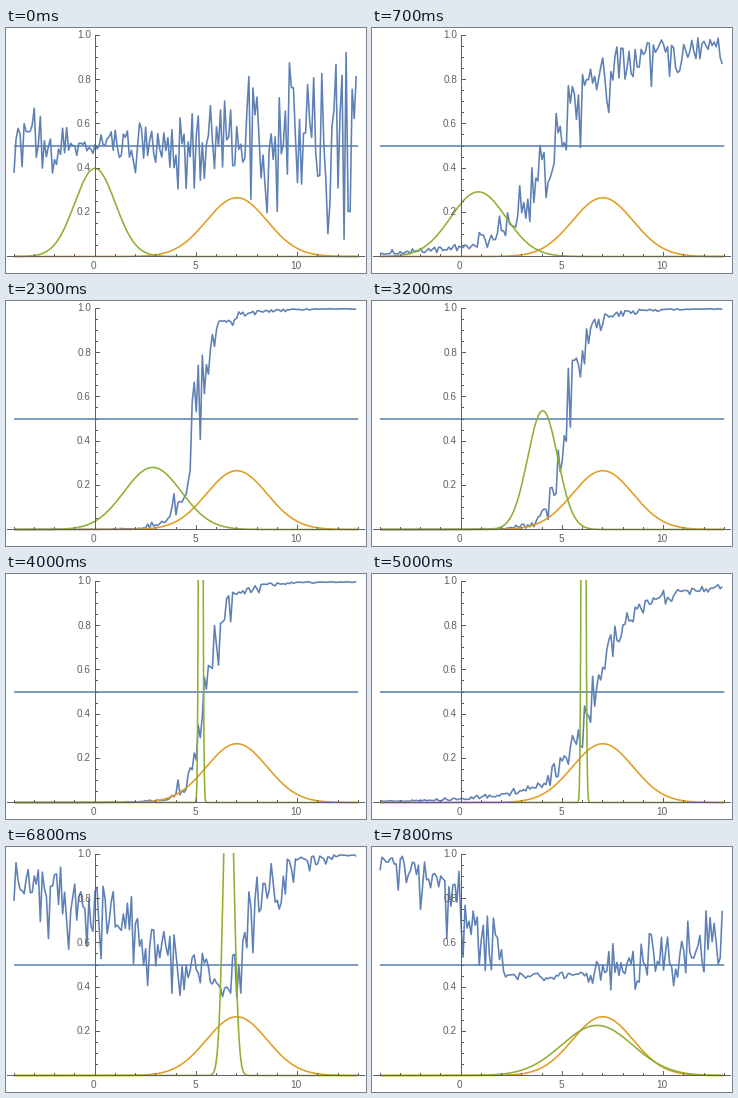
Animation, 360 px wide and 245 px high, one loop 8 s. Source, as a matplotlib script:

```python
import numpy as np
import matplotlib.pyplot as plt
from matplotlib.animation import FuncAnimation
from matplotlib.patches import Rectangle

W, H, DPI = 360, 245, 100
PT = 72 / DPI                      # points per pixel
X0, Y0, SX, SY = 89.0, 228.5, 20.25, 221.0
AXIS_X = 89.5
BLUE = (0.368, 0.507, 0.710)
ORANGE = (0.881, 0.611, 0.142)
GREEN = (0.560, 0.692, 0.195)
GRAY = "#606060"
TICKS, TICK_MS, STEPS = 80, 100, 48

plt.rcParams["font.family"] = "Liberation Sans"

# Generator state at a few training steps; linear in between.
KEYS = [0, 9, 14, 24, 30, 41, 47]
MEAN = [0, 1.93, 2.85, 5.22, 6.05, 6.60, 6.72]
SIGMA = [1, 1.82, 1.42, 0.065, 0.07, 0.24, 1.76]

grid = np.linspace(-4, 13, 1701)
samples = np.arange(-4, 12.95, 0.1)


def px(x):
    return X0 + SX * np.asarray(x)


def py(y):
    return Y0 - SY * np.asarray(y)


def normal(x, mean, sigma):
    return np.exp(-0.5 * ((x - mean) / sigma) ** 2) / (sigma * np.sqrt(2 * np.pi))


def ramp(step, start, end):
    return np.clip((step - start) / (end - start), 0, 1)


def mix(a, b, t):
    return a + (b - a) * t


def cliff(x, step):
    """Logit and spread while the two classes are told apart by one edge."""
    soft = ramp(step, 24, 30)
    u = x - np.interp(step, [9, 14, 24, 30], [4.55, 5.0, 5.45, 6.55])
    logit = mix(2.5, 1.9, soft) * np.arcsinh(mix(0.85, 0.55, soft) * u)
    logit += mix(0.4, 0.05, soft) * np.minimum(u, 0)
    return logit, mix(0.45, 0.25, soft)


def valley(x, step):
    """Logit and spread once the fake peak sits on the real one."""
    t = ramp(step, 41, 47)
    left = mix(0.24, 0.65, t) * np.maximum(mix(6.4, 2.3, t) - x, 0)
    right = mix(1.05, 0.11, t) * np.maximum(x - mix(6.6, 6.0, t), 0)
    return mix(-0.4, -0.2, t) + left + right, 0.04 + 0.4 * np.sqrt(left + right)


def discriminator(step):
    logit, spread = cliff(samples, step)
    end_logit, end_spread = valley(samples, step)
    known, merged = ramp(step, 0, 9), ramp(step, 30, 41)
    logit = mix(logit * known, end_logit, merged)
    spread = mix(0.07 + 0.09 * np.abs(samples), spread, known)
    spread = mix(spread, end_spread, merged)
    rng = np.random.default_rng(100 + step)
    noise = np.clip(rng.standard_normal(samples.size), -2.1, 2.1)
    return 1 / (1 + np.exp(-(logit + spread * noise)))


fig = plt.figure(figsize=(W / DPI, H / DPI), dpi=DPI, facecolor="white")
ax = fig.add_axes([0, 0, 1, 1])
ax.set_xlim(0, W)
ax.set_ylim(H, 0)
ax.axis("off")

window = Rectangle((0, 6), W, 225, transform=ax.transData)


def curve(x, y, color, z):
    line, = ax.plot(px(x), py(y), color=color, lw=1.6 * PT, zorder=z, snap=False,
                    solid_joinstyle="round", solid_capstyle="butt")
    line.set_clip_path(window)
    return line


def rule(xs, ys):
    ax.plot(xs, ys, color=GRAY, lw=PT, zorder=6, snap=False, solid_capstyle="butt")


def label(x, y, text, align):
    ax.text(x, y, text, size=10 * PT, color=GRAY, ha=align, va="baseline", zorder=7)


def draw_axes():
    rule([1, 359], [Y0, Y0])
    rule([AXIS_X, AXIS_X], [7, Y0])
    for n in range(-4, 14):
        major = n % 5 == 0
        x = np.floor(px(n)) + 0.5
        rule([x, x], [Y0, Y0 - (4.5 if major else 2.5)])
        if major and n >= 0:
            label(px(n) - 1.3, 240.5, str(n), "center")
    for n in range(1, 21):
        major = n % 4 == 0
        y = np.floor(py(n / 20)) + 0.5
        rule([AXIS_X, AXIS_X + (4.5 if major else 2.5)], [y, y])
        if major:
            label(85, py(n / 20) + 3.0, f"{n / 20:.1f}", "right")


draw_axes()
score = curve(samples, discriminator(0), BLUE, 2)
curve([-4, 13], [0.5, 0.5], BLUE, 3)
curve(grid, normal(grid, 7, 1.5), ORANGE, 4)
fake = curve(grid, normal(grid, 0, 1), GREEN, 5)


def update(i):
    step = min(int((i + 0.5) * STEPS / TICKS), STEPS - 1)
    mean = np.interp(step, KEYS, MEAN)
    sigma = np.interp(step, KEYS, SIGMA)
    score.set_ydata(py(discriminator(step)))
    fake.set_ydata(py(normal(grid, mean, sigma)))
    return score, fake


anim = FuncAnimation(fig, update, frames=TICKS, interval=TICK_MS,
                     repeat=True, repeat_delay=0, blit=False)
plt.show()
```
